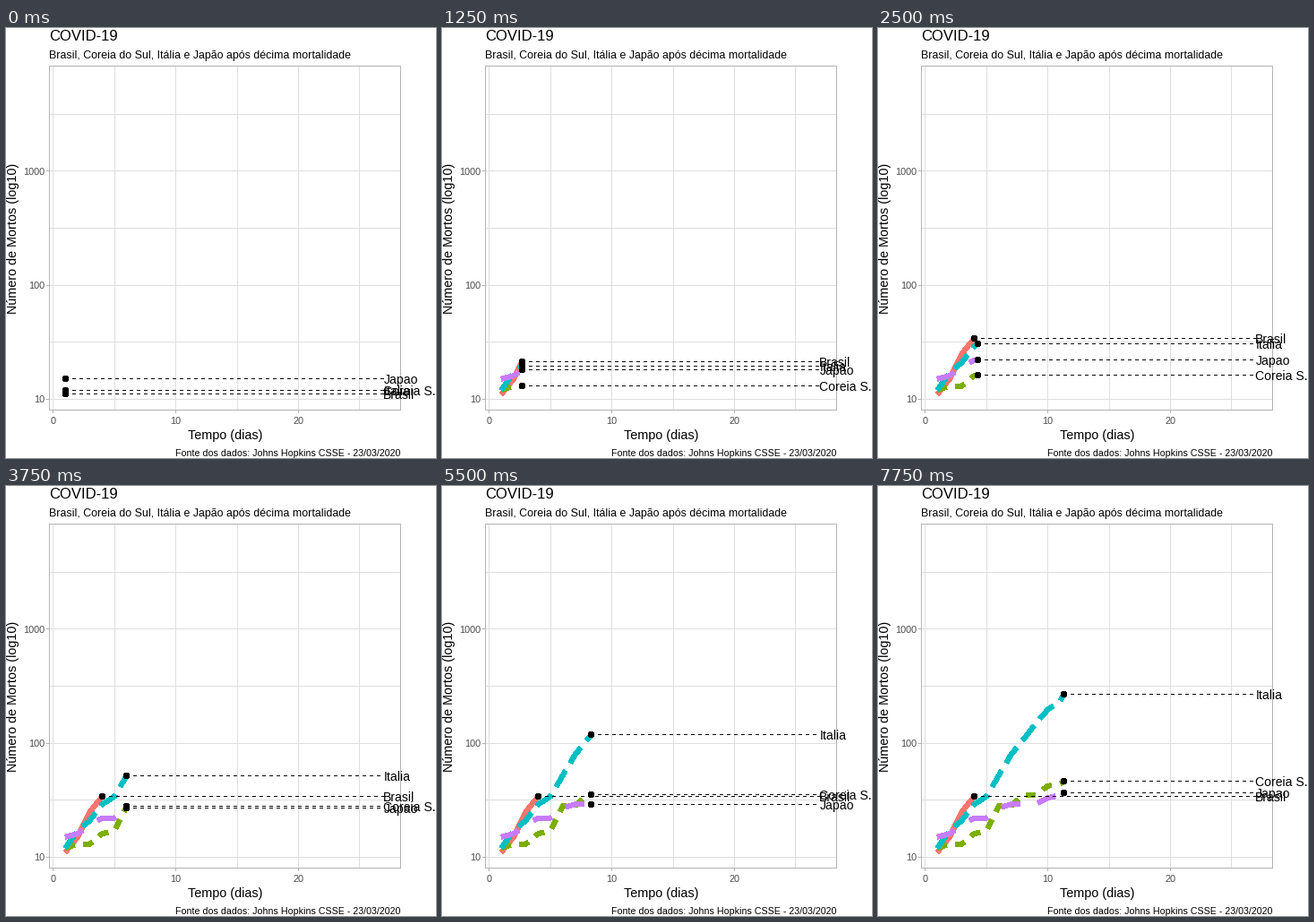
A matplotlib script for the animation above (8 s loop, 480 by 480 pixels).

```python
import numpy as np
import matplotlib.pyplot as plt
from matplotlib.animation import FuncAnimation
from matplotlib.patches import Circle, Rectangle

plt.rcParams["font.family"] = "Liberation Sans"

SIZE, DPI = 480, 100
PT = 72 / DPI                # points per pixel
FRAMES, INTERVAL = 32, 250
STEPS_PER_DAY = 3
LABEL_DAY = 27
LEFT, RIGHT, TOP, BOTTOM = 48.5, 440.5, 42.5, 426.5
GRID, BORDER, TICK_TEXT = "#dedede", "#b3b3b3", "#4d4d4d"

# name, colour, dash pattern in line widths, deaths per day from day 1
SERIES = [
    ("Brasil", "#F8766D", None, [11, 15, 25, 34]),
    ("Coreia S.", "#7CAE00", (2.1, 2.1),
     [12, 13, 13, 16, 17, 28, 28, 35, 35, 42, 44, 50]),
    ("Italia", "#00BFC4", (4.2, 2.1),
     [12, 17, 21, 29, 34, 52, 79, 107, 148, 197, 233, 366]),
    ("Japao", "#C77CFF", (4.2, 4.2),
     [15, 16, 19, 22, 22, 27, 29, 29, 29, 33, 35, 41]),
]


def to_x(day):
    return 52.6 + 13.695 * day


def to_y(log_count):
    return 414.1 - 127.08 * (log_count - 1)


def mid(v):
    """Centre of the pixel that holds v."""
    return np.floor(v) + 0.5


fig = plt.figure(figsize=(SIZE / DPI, SIZE / DPI), dpi=DPI, facecolor="white")
ax = fig.add_axes([0, 0, 1, 1])
ax.set_xlim(0, SIZE)
ax.set_ylim(SIZE, 0)
ax.axis("off")


def line(xs, ys, color, width=1, **kw):
    return ax.plot(xs, ys, color=color, lw=width * PT, snap=False,
                   solid_capstyle="butt", dash_capstyle="butt", **kw)[0]


def text(x, y, s, px, color="black", ha="left", **kw):
    return ax.text(x, y, s, fontsize=px * PT, color=color, ha=ha,
                   va="baseline", zorder=9, **kw)


def draw_panel():
    for day in range(0, 26, 5):
        x = mid(to_x(day))
        line([x, x], [TOP, BOTTOM], GRID, zorder=1)
        if day % 10 == 0:
            line([x, x], [BOTTOM, BOTTOM + 3.5], BORDER, zorder=1)
            text(x, 442, str(day), 10.9, TICK_TEXT, "center")
    for log_count in np.arange(1, 4, 0.5):
        y = mid(to_y(log_count))
        line([LEFT, RIGHT], [y, y], GRID, zorder=1)
        if log_count % 1 == 0:
            line([LEFT - 3.5, LEFT], [y, y], BORDER, zorder=1)
            text(43, to_y(log_count) + 4.4, str(10 ** int(log_count)), 10.9,
                 TICK_TEXT, "right")
    ax.add_patch(Rectangle((LEFT, TOP), RIGHT - LEFT, BOTTOM - TOP, fill=False,
                           ec=BORDER, lw=PT, snap=False, zorder=2))


def draw_titles():
    text(48, 14, "COVID-19", 16.6)
    text(48, 34, "Brasil, Coreia do Sul, Itália e Japão após décima "
         "mortalidade", 12.36)
    text(244.5, 459, "Tempo (dias)", 14.4, ha="center")
    text(440, 478, "Fonte dos dados: Johns Hopkins CSSE - 23/03/2020", 10.57,
         ha="right")
    text(12, 234.5, "Número de Mortos (log10)", 14.4, ha="center",
         rotation=90, rotation_mode="anchor")


class Track:
    """One country: trail, leader line, head dot and label."""

    def __init__(self, name, color, dashes, counts):
        self.days = np.arange(1, len(counts) + 1)
        self.logs = np.log10(counts)
        style = (0, dashes) if dashes else "-"
        self.trail = line([], [], color, 5, ls=style, zorder=3,
                          antialiased=False, solid_joinstyle="round",
                          dash_joinstyle="round")
        self.leader = line([], [], "black", ls=(0, (4, 4)), zorder=4)
        self.dot = ax.add_patch(Circle((0, 0), 3.5, color="black", lw=0,
                                       zorder=5, antialiased=False))
        self.label = text(to_x(LABEL_DAY) - 1, 0, name, 14)

    def update(self, day):
        day = min(day, self.days[-1])
        log_now = np.interp(day, self.days, self.logs)
        past = self.days < day
        self.trail.set_data(to_x(np.append(self.days[past], day)),
                            to_y(np.append(self.logs[past], log_now)))
        x, y = to_x(day), to_y(log_now)
        self.leader.set_data([np.floor(x), np.floor(to_x(LABEL_DAY))],
                             [mid(y)] * 2)
        self.dot.center = mid(x), mid(y)
        self.label.set_y(y + 5.5)


draw_panel()
draw_titles()
tracks = [Track(*row) for row in SERIES]


def update(i):
    for track in tracks:
        track.update(1 + i / STEPS_PER_DAY)
    return []


anim = FuncAnimation(fig, update, frames=FRAMES, interval=INTERVAL,
                     init_func=lambda: update(0), repeat=True, repeat_delay=0,
                     blit=False)
plt.show()
```
